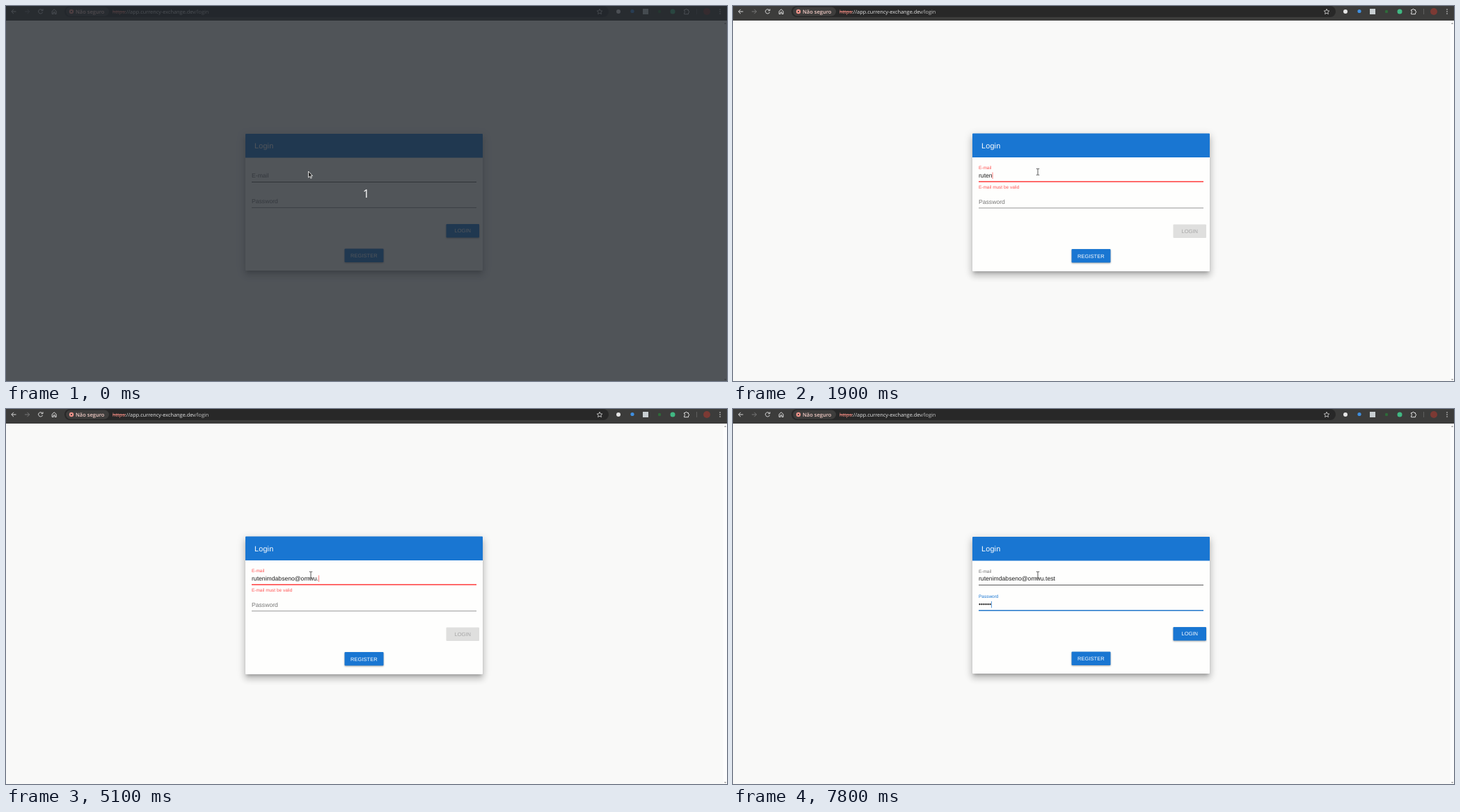
These frames come from a looping animation (1036x540 px, 8000 ms). An HTML page:

```html
<!DOCTYPE html>
<html lang="en">
<head>
<meta charset="utf-8">
<title>Login</title>
<style>
html, body { margin: 0; width: 100%; height: 100%; overflow: hidden; background: #f9f9f8; }
#card {
  position: absolute; left: 344px; width: 341px; border-radius: 1px; background: #fefefd;
  box-shadow: 0 3.8px 4.3px -2.2px rgba(0,0,0,.2), 0 6.5px 9.2px 1px rgba(0,0,0,.14), 0 2.7px 11.9px 2.2px rgba(0,0,0,.12);
}
svg { position: absolute; left: 0; top: 0; }
text { font: 8.64px "Liberation Sans", Arial, sans-serif; text-rendering: geometricPrecision; white-space: pre; }
.bar text { font: 7.37px "Open Sans", "Noto Sans", sans-serif; }
.bar .chip { font-size: 7.5px; font-weight: 600; }
.icon { fill: none; stroke: #dcdcdc; stroke-width: 1; }
.btn text { font-size: 7.55px; text-anchor: middle; }
.raised { fill: #1976d2; filter: drop-shadow(0 1px 1px rgba(0,0,0,.35)); }
#count { font: 16.5px "Open Sans", "Noto Sans", sans-serif; text-anchor: middle; }
</style>
</head>
<body>
<div id="card"></div>
<svg width="1036" height="540" viewBox="0 0 1036 540">
  <g class="bar">
    <rect width="1036" height="21" fill="#3c3c3b"/>
    <rect x="84" y="0" width="782" height="16" rx="8" fill="#282828"/>
    <rect x="86" y="1.5" width="62" height="13" rx="6.5" fill="#3e3d3c"/>
    <g class="icon">
      <path d="M14.5 8H8M11 4.8L7.8 8l3.2 3.2"/>
      <path d="M27 8h6.500M30.500 4.800L33.700 8l-3.200 3.200" stroke="#777"/>
      <path d="M52.200 6A3.100 3.100 0 1 0 52.600 9M53 4.300V6.800H50.500"/>
      <path d="M66.200 7.500V11.500H68.200V8.800H70.200V11.500H72.200V7.500L69.200 4.800Z"/>
      <path d="M853 4.300l1.100 2.500 2.700.300-2 1.800.600 2.700-2.400-1.400-2.400 1.400.600-2.700-2-1.800 2.700-.300Z" stroke-width=".8"/>
      <path d="M974.500 5.500H976.300a1.200 1.200 0 0 1 2.400 0H980.500V7.300a1.200 1.200 0 0 1 0 2.400V11.700H974.500V9.700a1.200 1.200 0 0 0 0-2.400Z"/>
    </g>
    <circle cx="94" cy="8" r="3.200" fill="#f2958c"/>
    <path d="M92.800 6.800l2.400 2.400M95.200 6.800l-2.400 2.400" stroke="#3e3d3c" stroke-width=".9"/>
    <text class="chip" x="100" y="10.600" fill="#f1cbc5">Não seguro</text>
    <text x="153" y="10.600" fill="#e8e8e8"><tspan fill="#f28b82">https</tspan>://app.currency-exchange.dev<tspan fill="#c4c4c4">/login</tspan></text>
    <path d="M153 8.300H172" stroke="#f28b82" stroke-width=".8"/>
    <circle cx="880" cy="8" r="3" fill="#e6e6e6"/>
    <circle cx="900" cy="7.500" r="2.600" fill="#3f8fe0"/>
    <rect x="915" y="4" width="8" height="8" fill="#c9cfd2"/>
    <circle cx="939" cy="8" r="2.200" fill="#2f6b3a"/>
    <circle cx="958" cy="8" r="3.500" fill="#41b883"/>
    <path d="M992.500 4V12" stroke="#5e5e5e"/>
    <circle cx="1007" cy="8" r="5" fill="#7c3a34"/>
    <g fill="#dcdcdc"><circle cx="1026" cy="5" r=".8"/><circle cx="1026" cy="8" r=".8"/><circle cx="1026" cy="11" r=".8"/></g>
  </g>
  <rect x="1030.500" y="21" width="5.500" height="519" fill="#fdfdfd"/>
  <path d="M1031.800 26l1.700-2 1.700 2ZM1031.800 537l1.700 2 1.700-2Z" fill="#999"/>

  <g id="upper">
    <path d="M344 218.500V185a1 1 0 0 1 1-1H684a1 1 0 0 1 1 1V218.500Z" fill="#1976d2"/>
    <text x="357" y="205.200" fill="#fff" style="font-size:10.8px;letter-spacing:.2px">Login</text>
    <g id="mail"></g>
  </g>
  <g id="lower">
    <text id="hint" x="353" fill="#ff5252" style="font-size:6.48px">E-mail must be valid</text>
    <g id="pass"></g>
    <g class="btn">
      <g id="on">
        <rect class="raised" x="632.500" y="314" width="47.500" height="19.500" rx="1"/>
        <text x="656.300" y="326.300" fill="#fff">LOGIN</text>
      </g>
      <g id="off">
        <rect x="632.500" y="314" width="47.500" height="19.500" rx="1" fill="#dfdfde"/>
        <text x="656.300" y="326.300" fill="#a5a5a5">LOGIN</text>
      </g>
      <rect class="raised" x="486.500" y="349.500" width="56" height="19.500" rx="1"/>
      <text x="514.400" y="362" fill="#fff">REGISTER</text>
    </g>
  </g>
  <g id="shade">
    <rect width="1036" height="540" fill="#23282e" opacity=".79"/>
    <text id="count" x="517.500" y="276" fill="#fff">1</text>
    <path d="M434.500 238V247l2-1.800 1.400 3 1.400-.700-1.400-2.800h2.700Z" fill="#222" stroke="#fff" stroke-width=".8"/>
  </g>
  <path id="beam" d="M-2.200-4.500H-.700L0-4 .700-4.500H2.200M0-4V4M-2.200 4.500H-.700L0 4 .700 4.500H2.200" fill="none" stroke="#444" stroke-width=".9"/>
</svg>
<script>
const LOOP = 8000, BLUE = '#1976d2', RED = '#ff5252', GREY = '#757575';
const $ = id => document.getElementById(id);
const mix = (a, b, p) => `color-mix(in srgb, ${b} ${p * 100}%, ${a})`;
const attr = (el, values) => { for (const k in values) el.setAttribute(k, values[k]); };

const address = 'rutenimdabseno@omwu.test';
const mailKeys = [1400, 1600, 1700, 1800, 1900, 2200, 2500, 2700, 2900, 3100, 3200, 3500,
  3600, 3700, 4100, 4500, 4700, 4800, 4900, 5100, 5300, 5500, 5600, 5700];
const passKeys = [6800, 7000, 7200, 7500, 7600, 7800];
const typed = (text, keys, t) => text.slice(0, keys.filter(k => k <= t).length);

// cubic-bezier(.25, .8, .5, 1)
function ease(x) {
  if (x <= 0 || x >= 1) return x <= 0 ? 0 : 1;
  let lo = 0, hi = 1, s;
  for (let i = 0; i < 20; i++) {
    s = (lo + hi) / 2;
    const px = .75 * s * (1 - s) ** 2 + 1.5 * s * s * (1 - s) + s ** 3;
    if (px < x) lo = s; else hi = s;
  }
  return 2.4 * s * (1 - s) ** 2 + 3 * s * s * (1 - s) + s ** 3;
}
const ramp = (t, start) => ease((t - start) / 300);

function makeField(id, name, base, lineAlpha) {
  const g = $(id), y = base + 5.7;
  g.innerHTML = `<rect x="353" y="${y}" width="323" height="1"/>
    <rect y="${y - .4}" height="1.4"/>
    <text>${name}</text>
    <text x="353" y="${base}" fill="#1e1e1e"></text>
    <rect y="${base - 7.3}" width=".7" height="9.5"/>`;
  const [line, active, label, value, caret] = g.children;
  return ({ text, float, focus, error, caretOn }) => {
    const accent = mix(BLUE, RED, error);
    line.style.fill = mix(`rgba(0,0,0,${lineAlpha})`, RED, error);
    attr(active, { x: 514.5 - 161.5 * focus, width: 323 * focus });
    active.style.fill = caret.style.fill = accent;
    attr(label, { transform: `translate(353 ${base - 11.8 * float}) scale(${1 - .25 * float})` });
    label.style.fill = mix(GREY, accent, focus);
    if (value.textContent !== text) value.textContent = text;
    attr(caret, { x: 353 + (text ? value.getComputedTextLength() : 0), opacity: caretOn ? 1 : 0 });
  };
}
const drawMail = makeField('mail', 'E-mail', 247.3, .65);
const drawPass = makeField('pass', 'Password', 284.2, .42);

function draw(t) {
  const enter = ramp(t, 550), swap = ramp(t, 6060);
  const error = ramp(t, 1360) - ramp(t, 5460);

  $('card').style.top = 184 - error / 2 + 'px';
  $('card').style.height = 197 + error + 'px';
  attr($('upper'), { transform: `translate(0 ${-error / 2})` });
  attr($('lower'), { transform: `translate(0 ${error / 2})` });
  attr($('hint'), { y: 258.3 + 4.3 * error, opacity: error });
  attr($('on'), { opacity: 1 - error });
  attr($('off'), { opacity: error });

  drawMail({
    text: typed(address, mailKeys, t), float: enter, focus: enter - swap, error,
    caretOn: t >= 600 && t < 1100 || t >= 1400 && t < 6100
  });
  drawPass({
    text: typed('••••••', passKeys, t), float: swap, focus: swap, error: 0,
    caretOn: t >= 6100 && t < 6600 || t >= 6800
  });

  attr($('shade'), { visibility: t < 100 ? 'visible' : 'hidden' });
  const x = 435 + 3 * Math.min(1, Math.max(0, (t - 300) / 200));
  attr($('beam'), { transform: `translate(${x} 238.8)`, visibility: t < 100 ? 'hidden' : 'visible' });
}

const start = performance.now();
function tick() {
  const t = (performance.now() - start) % LOOP;
  draw(Math.floor(t / 100) * 100);
  requestAnimationFrame(tick);
}
tick();
</script>
</body>
</html>
```
